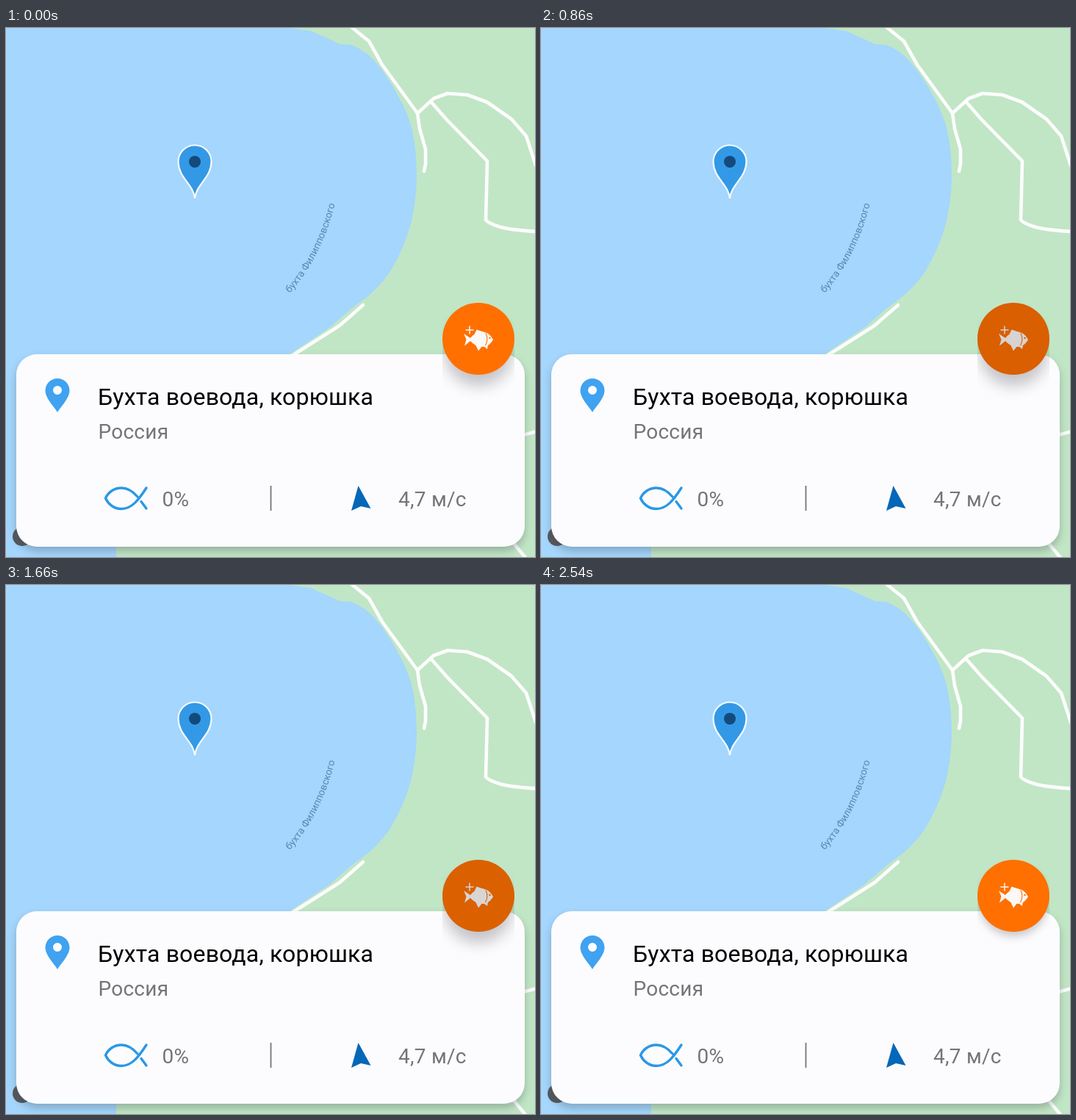
An HTML page for the animation above (2.56 s loop, 720x720 px).

```html
<!DOCTYPE html>
<html lang="ru">
<head>
<meta charset="utf-8">
<title>Map card</title>
<style>
  html, body { margin: 0; width: 100%; height: 100%; overflow: hidden; background: #c1e6c5; }
  svg { display: block; width: 100vw; height: 100vh; }
  text { font-family: Roboto, sans-serif; }
  .roads { fill: none; stroke: #fdfdfd; stroke-width: 4.6; stroke-linecap: round; stroke-linejoin: round; }
  .bay { font-size: 13.5px; fill: #5688b2; }
  .title { font-size: 32px; letter-spacing: .16px; fill: #000; }
  .info { font-size: 28px; letter-spacing: .25px; fill: #757577; }
  .line { fill: none; stroke: #2a98e6; stroke-width: 3.4; stroke-linecap: round; }
</style>
</head>
<body>
<svg viewBox="0 0 720 720">
  <defs>
    <filter id="soft" x="-50%" y="-50%" width="200%" height="200%"><feGaussianBlur stdDeviation="6"/></filter>
    <filter id="wide" x="-50%" y="-50%" width="200%" height="200%"><feGaussianBlur stdDeviation="10"/></filter>
    <clipPath id="column"><rect x="594" y="374" width="98" height="146"/></clipPath>
    <path id="arc" d="M386 361Q431 311 449 234"/>
  </defs>

  <!-- map -->
  <rect width="720" height="720" fill="#c1e6c5"/>
  <path fill="#a4d6fe" d="M0 0H386L415 4 435 13 455 22 470 23Q488 30 501 44L514 60 527 80 540 104Q551 126 555 150T559 205Q558 240 550 270T522 333Q510 350 494 364L470 382 440 408 386 444 150 706V720H0Z"/>
  <g class="roads">
    <path d="M468-3 494 18 512 50 560 116 563 137 571 165V185L569 195"/>
    <path d="M560 116 582 96 601 89 628 91 655 101 688 124 708 147 721 187"/>
    <path d="M579 101 600 125 655 181 653 261Q655 265 670 270T722 277"/>
    <path d="M380 452 454 405 486 377"/>
    <path d="M700 555 722 549M688 698 708 722"/>
  </g>
  <text class="bay"><textPath href="#arc">бухта Филипповского</textPath></text>
  <path d="M257 232C255 212 234.500 204 234.500 182A22.500 22.500 0 0 1 279.500 182C279.500 204 259 212 257 232Z" fill="#3399e6" stroke="#f4faff" stroke-width="2.200"/>
  <circle cx="257" cy="182" r="8" fill="#134a7c"/>
  <circle cx="22" cy="692" r="13" fill="#55585c"/>

  <!-- card -->
  <rect x="14" y="450" width="692" height="262" rx="28" fill="#3c4650" opacity=".32" filter="url(#soft)"/>
  <rect x="14" y="444" width="692" height="262" rx="28" fill="#fcfcfe"/>
  <path fill="#40a2f0" fill-rule="evenodd" d="M70 523C66 516 53.500 504 53.500 493.500A16.500 16.500 0 0 1 86.500 493.500C86.500 504 74 516 70 523ZM64 493a6 6 0 1 0 12 0a6 6 0 1 0-12 0Z"/>
  <text class="title" x="125" y="513">Бухта воевода, корюшка</text>
  <text class="info" x="125.500" y="559">Россия</text>
  <path class="line" d="M191 626C180 643 171 654.500 157 654.500C147 654.500 139 648 135.500 640C139 632 147 626 157 626C166 626 173 631 179 638M184 644.500 191 654"/>
  <text class="info" x="212.500" y="651">0%</text>
  <path d="M360.500 623V657" stroke="#757577" stroke-width="1.800"/>
  <path d="M479.500 623 496.500 654 483 651 470 657Z" fill="#0567b8"/>
  <text class="info" x="534" y="651">4,7 м/с</text>

  <!-- button -->
  <g fill="#2c2c34" clip-path="url(#column)">
    <circle id="high" cx="643" cy="441" r="46" opacity=".27" filter="url(#wide)"/>
    <circle id="low" cx="643" cy="431" r="47" opacity="0" filter="url(#soft)"/>
  </g>
  <circle cx="643" cy="423" r="49" fill="#ff7000"/>
  <g fill="#fcf8f6">
    <path d="M632 422C637 416 643 413 649 413.500C656 414 660 419 663 424C660 430 655 434 648 434C641 434 636 430 632 426L624 432.500 626.500 424 623 416Z"/>
    <path d="M637 418 640.500 410.500 651 414ZM639 431 643 439.500 648 433ZM650 433 655 437 656 431Z"/>
    <path d="M631 405.500V416.500M625.500 411H636.500" stroke="#fcf8f6" stroke-width="1.500"/>
  </g>
  <path d="M653 415.500Q657 424 652.500 432" fill="none" stroke="#ff7000" stroke-width="1.100"/>
  <circle cx="658.500" cy="422" r="1.200" fill="#ff7000"/>
  <circle id="shade" cx="643" cy="423" r="49" opacity="0"/>
</svg>
<script>
  const LOOP = 2560;
  // Each track is a list of [ms, opacity] steps.
  const tracks = {
    shade: [[0, 0], [20, 0], [250, .15], [1660, .14], [2240, 0], [LOOP, 0]],
    high: [[0, .27], [1680, .27], [1820, 0], [LOOP, 0]],
    low: [[0, 0], [1680, 0], [1820, .25], [LOOP, .25]]
  };
  for (const [id, steps] of Object.entries(tracks)) {
    const frames = steps.map(([ms, opacity]) => ({ offset: ms / LOOP, opacity }));
    document.getElementById(id).animate(frames, { duration: LOOP, iterations: Infinity });
  }
</script>
</body>
</html>
```
